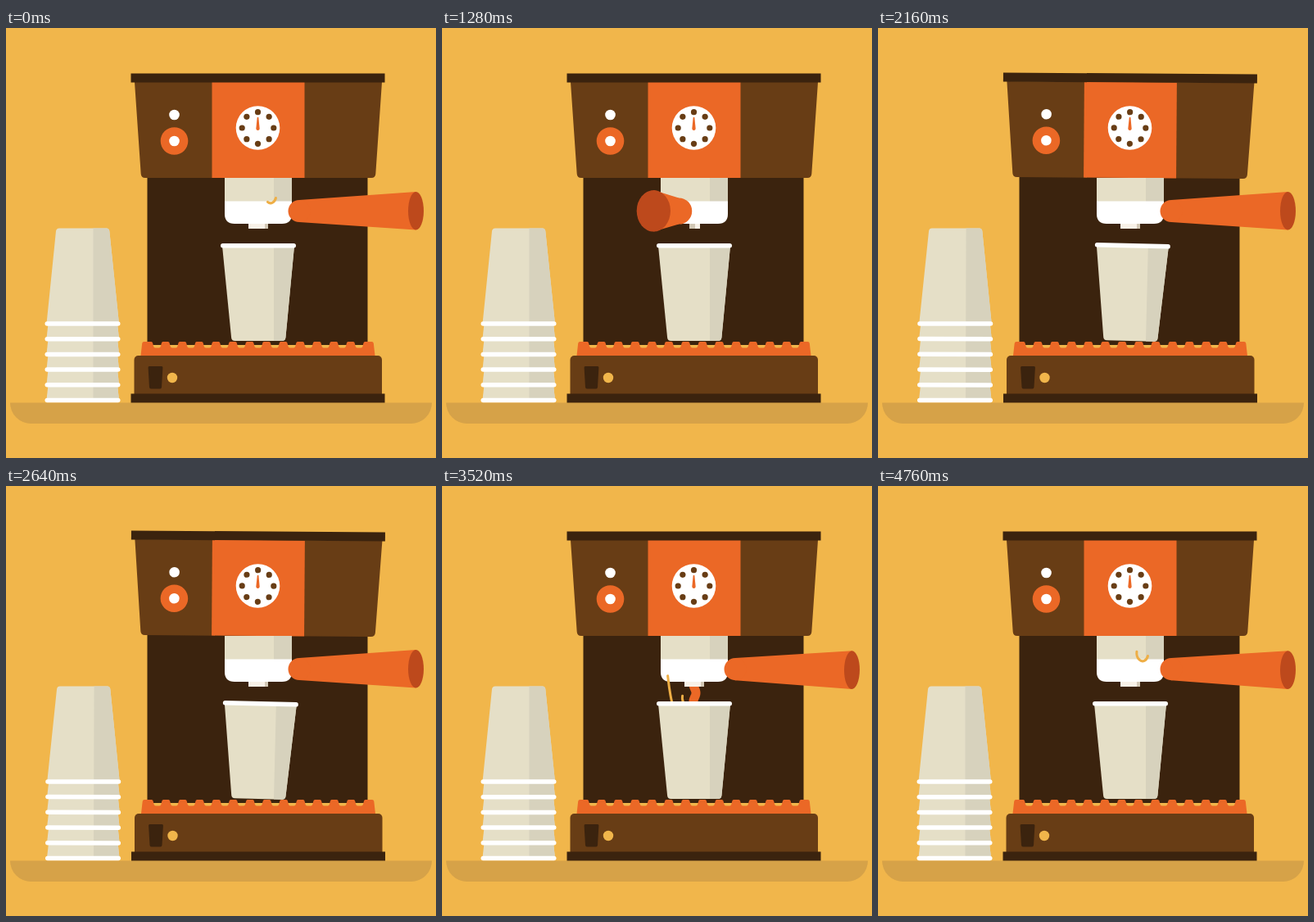
Write an HTML page that moves like this. It is 525 by 525 pixels and loops after 4.8 s.

```html
<!DOCTYPE html>
<html lang="en">
<head>
<meta charset="utf-8">
<title>Coffee machine</title>
<style>
  html, body { margin: 0; width: 100%; height: 100%; overflow: hidden; background: #f1b64b; }
  svg { display: block; width: 100vw; height: 100vh; }
  .dark { fill: #3b230e; }
  .brown { fill: #683d15; }
  .orange { fill: #eb6826; }
  .white { fill: #fff; }
  .paper { fill: #e5dfc7; }
  .shade { fill: #d7d2bd; }
  .steam path { fill: none; stroke: #eeae45; stroke-width: 3; stroke-linecap: round; }
</style>
</head>
<body>
<svg viewBox="0 0 525 525">
  <path fill="#d6a248" d="M5 457.5H520A25.500 25.500 0 0 1 494.500 483H30.500A25.500 25.500 0 0 1 5 457.500Z"/>

  <g id="stack"></g>

  <rect class="dark" x="172.500" y="175" width="269" height="212"/>
  <g id="base">
    <path id="grate" class="orange"/>
    <rect class="brown" x="156.500" y="400" width="302.500" height="52" rx="5"/>
    <rect class="dark" x="152.500" y="446.500" width="310" height="11"/>
    <path class="dark" d="M175 413H190Q191.500 413 191.400 414.500L190 438.500Q189.800 440.500 188 440.500H177Q175.200 440.500 175 438.500L173.600 414.500Q173.500 413 175 413Z"/>
    <circle cx="203" cy="427" r="6.200" fill="#f1b64b"/>
  </g>

  <g id="head">
    <path class="brown" d="M157 66H459L451.300 178Q451 183 446 183H170Q165 183 164.700 178Z"/>
    <rect class="orange" x="251.500" y="66" width="113" height="117"/>
    <rect class="dark" x="152.500" y="55.500" width="310" height="11"/>
    <circle class="white" cx="205.500" cy="106" r="6.300"/>
    <circle class="orange" cx="205.500" cy="138" r="16.800"/>
    <circle class="white" cx="205.500" cy="138" r="6.300"/>
    <circle class="white" cx="307.500" cy="122" r="26.800"/>
    <g id="dots" class="brown"></g>
    <path class="orange" d="M306.700 109H308.300L309.700 123Q309.500 125 307.500 125Q305.500 125 305.300 123Z"/>
  </g>

  <path id="pour" fill="none" stroke="#eb6826" stroke-width="11"/>
  <rect id="spoutShade" y="237" height="8" fill="#d2c8b6"/>
  <rect id="spout" y="237" height="8" fill="#f8f1e8"/>
  <rect class="paper" x="267" y="183" width="82" height="30"/>
  <rect class="shade" x="327" y="183" width="22" height="30"/>
  <path class="white" d="M267 211.500H349V227Q349 239 337 239H279Q267 239 267 227Z"/>

  <g id="handle">
    <path id="grip" class="orange"/>
    <circle id="tip" class="orange" cy="223.500"/>
    <ellipse id="cap" cy="223.300" fill="#bd491c"/>
  </g>

  <g class="steam">
    <path pathLength="100" data-t="3475 3900 3800 4440" d="M281 265C272 230 280 205 255 190C215 166 150 164 137 128C128 100 152 86 166 95C178 104 170 122 157 118"/>
    <path pathLength="100" data-t="3480 4170 4170 4850" d="M296 267C284 246 316 240 340 225C372 205 364 184.500 340 184.500C318 184.500 311 205 319 212C323 216 328 213 329.500 207.500"/>
    <path pathLength="100" data-t="3540 4080 3960 4470" d="M330 267C345 238 380 265 420 292C455 320 492 326 494.500 292C494 262 464 260 464 280"/>
  </g>

  <g id="cup">
    <path class="paper" d="M264 266H352L341.400 378Q341 382 337 382H279.500Q275.500 382 275.100 378Z"/>
    <path class="shade" d="M327 266H352L341.400 378Q341 382 337 382H327Z"/>
    <rect class="white" x="262" y="263" width="92" height="5.500" rx="2.750"/>
  </g>
</svg>
<script>
const LOOP = 4800;
const $ = id => document.getElementById(id);
const clamp = v => Math.max(0, Math.min(1, v));
const span = (t, a, b) => clamp((t - a) / (b - a));
const ease = u => u < .5 ? 2 * u * u : 1 - 2 * (1 - u) ** 2;
const lerp = (a, b, u) => a + (b - a) * u;
const set = (id, attrs) => {
  for (const k in attrs) $(id).setAttribute(k, attrs[k]);
};

function buildStack() {
  let out = '<path class="paper" d="M65 244.500H122.500Q126 244.500 126.300 248L138 361H49.500L61 248Q61.500 244.500 65 244.500Z"/>' +
    '<path class="shade" d="M106.500 244.500H122.500Q126 244.500 126.300 248L138 361H106.500Z"/>';
  for (let i = 0; i < 6; i++) {
    const y = 361 + i * 18.7;
    if (i < 5) {
      out += `<path class="paper" d="M51.500 ${y}H136L138 ${y + 18}H49.500Z"/>` +
        `<path class="shade" d="M106.500 ${y}H136L138 ${y + 18}H106.500Z"/>`;
    }
    out += `<rect class="white" x="47.500" y="${y - 2.75}" width="92" height="5.500" rx="2.750"/>`;
  }
  $('stack').innerHTML = out;
}

function buildGrate() {
  let d = 'M164.500 400L166.200 385Q166.500 383 168.500 383';
  for (let i = 0; i < 13; i++) {
    const x = 184.5 + i * 20.55;
    d += `H${x - 7}Q${x - 5.5} 383 ${x - 5} 386Q${x - 4.5} 390.500 ${x - 2} 390.500H${x + 2}` +
      `Q${x + 4.5} 390.500 ${x + 5} 386Q${x + 5.5} 383 ${x + 7} 383`;
  }
  $('grate').setAttribute('d', d + 'H446.500Q448.500 383 448.800 385L450.500 400Z');
}

function buildDots() {
  for (let i = 0; i < 8; i++) {
    const a = i * Math.PI / 4;
    $('dots').innerHTML += `<circle cx="${307.5 + 19.3 * Math.cos(a)}" cy="${122 + 19.3 * Math.sin(a)}" r="3.600"/>`;
  }
}

// The handle swings left and back twice, coming toward the viewer.
function drawHandle(t) {
  const swing = ease(span(t, 0, 480)) - ease(span(t, 480, 880)) +
    ease(span(t, 880, 1400)) - ease(span(t, 1400, 1940));
  const end = lerp(500.5, 230, swing);
  const d = end - 308, off = Math.abs(d);
  const tip = 308 + d * (d > 0 ? .26 : .38);
  const r = 17 - off * .018, ry = 26 - off * .014;
  set('cap', { cx: end, rx: 24.5 - off * .078, ry });
  set('tip', { cx: tip, r });
  set('grip', { d: `M${tip} ${223.5 - r}L${end} ${223.3 - ry}V${223.3 + ry}L${tip} ${223.5 + r}Z` });
  set('handle', { transform: `rotate(${.5 * ease(span(t, 3280, 3480))} 345 223)` });

  const k = clamp((500.5 - end) / 231);
  const left = lerp(296, 302, k), white = lerp(296, 309, k);
  set('spoutShade', { x: left, width: lerp(320, 315, k) - left });
  set('spout', { x: white, width: lerp(316, 315, k) - white });
}

function drawShake(t) {
  const s = t > 1960 && t < 3240 ? Math.sin((t - 1960) / 160 * 2 * Math.PI) : 0;
  set('head', { transform: `rotate(${.4 * s} 308 122)` });
  set('cup', { transform: `rotate(${1.4 * s} 308 382)` });
  set('stack', { transform: `translate(${.5 * s}) rotate(${.15 * s} 93 457)` });
  set('base', { transform: `translate(${.5 * s})` });
}

function drawPour(t) {
  const top = lerp(242, 270, span(t, 4240, 4320));
  const bottom = lerp(242, 270, span(t, 3400, 3480));
  let d = '';
  for (let y = top; y < bottom; y++) {
    d += `${d ? 'L' : 'M'}${308.5 + 1.5 * Math.sin(y * .3 - t * .03)} ${y}`;
  }
  set('pour', { d });
}

function drawSteam(t) {
  const time = t < 200 ? t + LOOP : t;
  for (const p of document.querySelectorAll('.steam path')) {
    const [a, b, c, e] = p.dataset.t.split(' ').map(Number);
    const head = 100 * span(time, a, b), tail = 100 * span(time, c, e);
    p.style.visibility = head > tail ? 'visible' : 'hidden';
    p.setAttribute('stroke-dasharray', `${head - tail} 300`);
    p.setAttribute('stroke-dashoffset', -tail);
  }
}

function frame() {
  const t = (performance.now() - start) % LOOP;
  drawHandle(t);
  drawShake(t);
  drawPour(t);
  drawSteam(t);
  requestAnimationFrame(frame);
}

buildStack();
buildGrate();
buildDots();
const start = performance.now();
frame();
</script>
</body>
</html>
```
